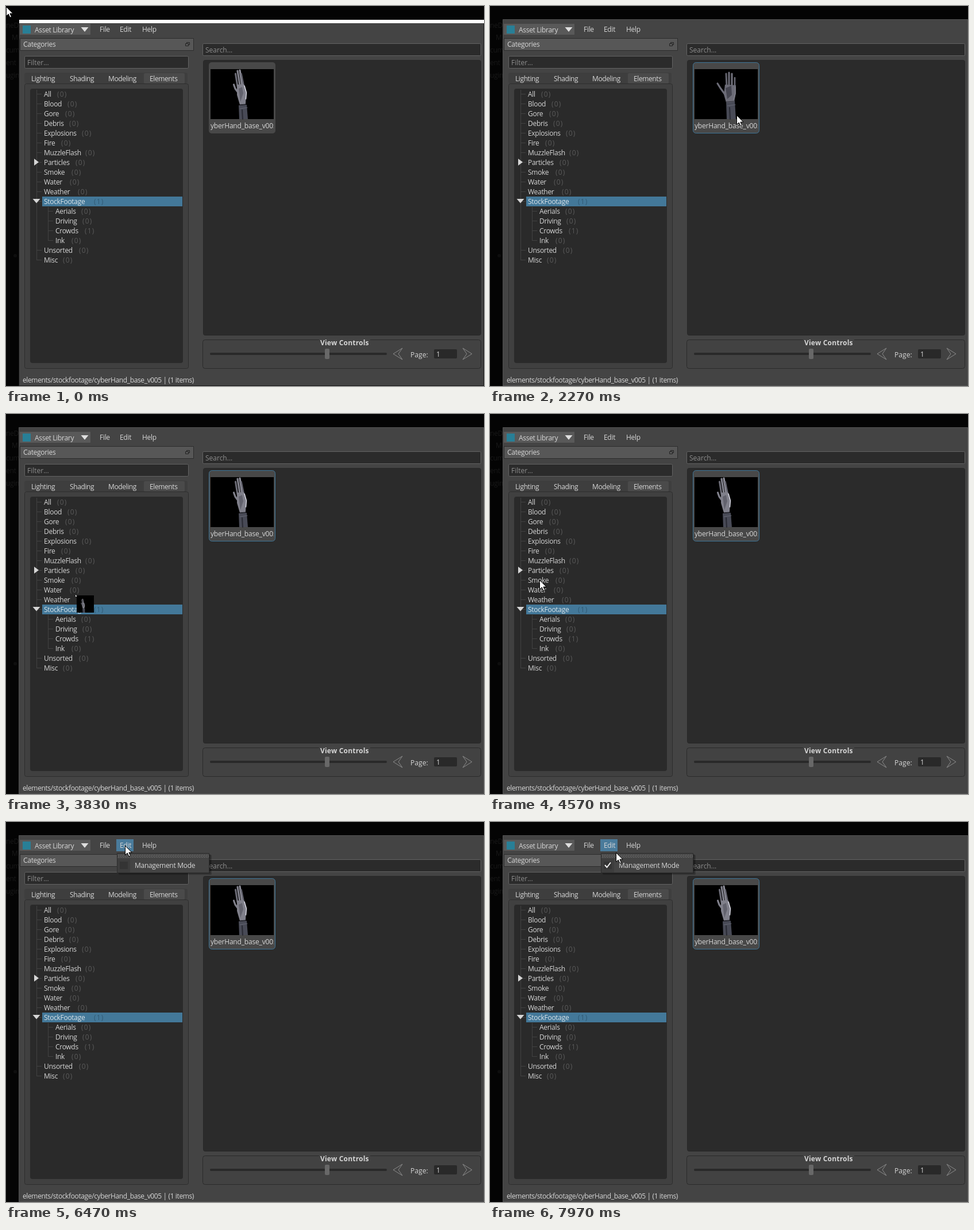
Animation, 832 px wide and 662 px high, one loop 8 s. Source, as an HTML page with a canvas:

```html
<!DOCTYPE html>
<html lang="en">
<head>
<meta charset="utf-8">
<title>Asset Library</title>
<style>
html, body { margin: 0; width: 100%; height: 100%; overflow: hidden; background: #000; }
canvas { display: block; }
</style>
</head>
<body>
<canvas id="stage" width="832" height="662"></canvas>
<script>
const ctx = document.getElementById('stage').getContext('2d');
const LOOP = 8000;
const ACTIVATE = 1770, SELECT = 1970, DRAG = 3130, DROP = 4570;
const OPEN = 6100, CHECK = 7270, REOPEN = 7800;
const BLUE = '#437899', DARK = '#2b2b2b', TEXT = '#d6d6d6', DIM = '#5a5a5a';

// Pointer path: time, x, y
const path = [
  [0, 0, 1], [370, 0, 1], [650, 150, 230], [840, 290, 317], [1030, 376, 190], [1170, 430, 166],
  [1230, 432, 168], [1330, 437, 178], [1970, 437, 178], [2100, 440, 212], [2270, 429, 190],
  [2470, 405, 166], [2700, 405, 166], [2870, 401, 176], [3130, 401, 176], [3430, 355, 247],
  [3700, 190, 339], [3930, 96, 295], [4000, 96, 295], [4170, 86, 289], [4900, 86, 289],
  [5130, 200, 345], [5430, 414, 220], [5700, 345, 117], [5730, 345, 117], [6120, 207, 41],
  [6470, 207, 41], [6700, 247, 69], [6870, 247, 69], [6930, 241, 68], [7570, 241, 68],
  [7780, 208, 41], [7970, 219, 53], [8000, 219, 53]
];

// Name, count, count position, indent
const tree = [
  ['All', 0, 89], ['Blood', 0, 107], ['Gore', 0, 103], ['Debris', 0, 110], ['Explosions', 0, 132],
  ['Fire', 0, 96], ['MuzzleFlash', 0, 138], ['Particles', 0, 121], ['Smoke', 0, 114],
  ['Water', 0, 111], ['Weather', 0, 125], ['StockFootage', 1, 153], ['Aerials', 0, 131, 20],
  ['Driving', 0, 133, 20], ['Crowds', 1, 137, 20], ['Ink', 0, 114, 20],
  ['Unsorted', 0, 127], ['Misc', 0, 99]
];

function pointerAt(t) {
  const i = Math.max(0, path.findIndex(p => p[0] > t) - 1);
  const a = path[i], b = path[i + 1], span = b[0] - a[0], u = (t - a[0]) / span;
  const still = (p, q) => !p || !q || (p[1] === q[1] && p[2] === q[2]);
  const slope = (k, axis) => {
    const p = path[k - 1], q = path[k + 1];
    return still(p, path[k]) || still(q, path[k]) ? 0 : (q[axis] - p[axis]) / (q[0] - p[0]) * span;
  };
  return [1, 2].map(axis =>
    (1 + 2 * u) * (1 - u) ** 2 * a[axis] + u * (1 - u) ** 2 * slope(i, axis) +
    u * u * (3 - 2 * u) * b[axis] - u * u * (1 - u) * slope(i + 1, axis));
}

function rect(x, y, w, h, fill, border, radius = 0) {
  ctx.beginPath();
  const o = border ? .5 : 0;
  ctx.roundRect(x + o, y + o, w - 2 * o, h - 2 * o, radius);
  if (fill) { ctx.fillStyle = fill; ctx.fill(); }
  if (border) { ctx.strokeStyle = border; ctx.lineWidth = 1; ctx.stroke(); }
}

function poly(points, fill, stroke, width = 1) {
  ctx.beginPath();
  points.forEach(p => ctx.lineTo(p[0], p[1]));
  if (fill) { ctx.closePath(); ctx.fillStyle = fill; ctx.fill(); }
  if (stroke) { ctx.strokeStyle = stroke; ctx.lineWidth = width; ctx.stroke(); }
}

function text(str, x, y, color = TEXT, spacing = -.3, weight = 400) {
  ctx.font = weight + ' 12px "Open Sans", "Noto Sans", sans-serif';
  ctx.letterSpacing = spacing + 'px';
  ctx.fillStyle = color;
  ctx.fillText(str, x, y);
}

// turn: 0 is the side pose, 1 the open palm
function drawHand(turn) {
  const mix = (x, y, X, Y) => [x + (X - x) * turn, y + (Y - y) * turn];
  const shade = (side, palm) => {
    const v = side + (palm - side) * turn;
    return `rgb(${v},${v},${v + 11})`;
  };
  const skin = shade(128, 108);
  ctx.lineCap = ctx.lineJoin = 'round';
  // forearm
  poly([mix(405, 173, 411, 166), mix(419, 172, 426, 165), mix(421, 197, 428, 197), mix(406, 197, 412, 197)], '#484a56');
  poly([mix(407, 179, 413, 174), mix(420, 177, 427, 172)], null, '#656773');
  poly([mix(411, 181, 417, 177), mix(412, 197, 418, 197)], null, '#2a2b34', 2);
  // thumb and fingers
  poly([mix(396.5, 137, 396, 135), mix(399, 144, 401, 143), mix(405, 152, 409, 154)], null, skin, 3.2);
  poly([mix(399.5, 118, 411, 118), mix(403, 140, 412, 140)], null, shade(108, 100), 3);
  poly([mix(403, 113, 416, 116), mix(407, 138, 416, 140)], null, skin, 3.2);
  poly([mix(407, 112, 421, 118), mix(411, 138, 421, 140)], null, shade(140, 112), 3.2);
  poly([mix(409.5, 118, 426, 125), mix(414, 140, 426, 142)], null, shade(100, 105), 2.6);
  // palm and lit edge
  poly([mix(402, 137, 409, 137), mix(414, 136, 428, 138), mix(418, 151, 428, 152), mix(417, 171, 425, 167),
    mix(407, 172, 411, 168), mix(402, 155, 407, 154)], skin);
  poly([mix(405, 144, 410, 143), mix(411, 141, 420, 139), mix(413, 152, 421, 155), mix(408, 167, 413, 162)], shade(98, 70));
  poly([mix(415, 139, 427, 141), mix(418.5, 151, 427, 152), mix(417.5, 162, 424, 163)], null, shade(225, 125), 1.5);
  poly([mix(407, 172, 411, 167), mix(417, 171, 425, 166)], null, '#30313a');
  ctx.lineCap = 'butt';
  ctx.lineJoin = 'miter';
}

function drawFrame(active) {
  rect(0, 0, 832, 662, '#040404');
  [['neD', 38], ['M', 59], ['cum', 81], ['ent', 103], ['ugin', 125]]
    .forEach(([s, y]) => text(s, s === 'M' ? 10 : 0, y, '#191919'));
  rect(13, 432, 6, 6, '#0e0e0e', null, 3);
  rect(22, 23, 810, 639, '#444', active ? '#4f4f4f' : '#171717');
  if (!active) {
    rect(22, 23, 810, 1, '#040404');
    rect(23, 24, 809, 6, '#fff');
  }
  rect(24, 31, 123, 19, '#595959');
  rect(29, 34, 14, 14, '#287f96');
  text('Asset Library', 50, 46);
  poly([[130.5, 37], [143.5, 37], [137, 45]], '#dedede');
  text('File', 163, 45);
  text('Help', 237, 45);
}

function drawCategories() {
  rect(24, 56, 303, 22, '#575757', '#2c2c2c');
  text('Categories', 30, 71);
  rect(314, 63, 6, 5, null, '#222');
  rect(312, 65, 6, 5, '#575757', '#222');
  rect(32, 87, 286, 22, DARK, '#626262', 2);
  text('Filter...', 37, 103, '#8d8d8d', 0);
  rect(32, 116, 284, 19, '#3e3e3e', null, 4);
  rect(240, 117, 71, 18, '#4a4a4a', null, 2);
  [['Lighting', 44], ['Shading', 111], ['Modeling', 178], ['Elements', 250]].forEach(([s, x]) => text(s, x, 131, TEXT, -.4));
  rect(32, 135, 286, 497, '#404040', '#2d2d2d', 3);
  rect(42, 144, 266, 478, '#2a2a2a', null, 4);
  rect(53, 146, 1, 297, '#424242');
  rect(73, 350, 1, 59, '#424242');
  rect(63, 332, 244, 17, BLUE);
  tree.forEach(([name, count, countX, indent = 0], i) => {
    const y = 158 + 17 * i, selected = name === 'StockFootage';
    rect(53 + indent, y - 5, 9, 1, '#424242');
    text(name, 66 + indent, y, selected ? '#d8e2e8' : TEXT);
    text(`(${count})`, countX, y, selected ? '#315a74' : DIM, 1.2);
  });
  poly([[49, 266], [57, 272], [49, 278]], '#d5d5d5');
  poly([[46.5, 336], [59.5, 336], [53, 343.5]], '#d5d5d5');
}

function drawAssets(turn, selected) {
  rect(342, 65, 485, 22, DARK, '#626262', 2);
  text('Search...', 347, 81, '#8d8d8d', 0);
  rect(343, 94, 484, 480, '#2b2b2b', '#272727', 3);
  rect(353, 98, 116, 124, '#484848', selected ? '#3f7698' : null, 5);
  rect(356, 110, 110, 87, '#000');
  ctx.save();
  ctx.beginPath();
  ctx.rect(356, 110, 110, 110);
  ctx.clip();
  drawHand(turn);
  ctx.textAlign = 'center';
  text('cyberHand_base_v005', 411, 213, TEXT, -.2);
  ctx.restore();
}

function drawControls() {
  rect(342, 581, 485, 51, '#424242', '#2a2a2a', 4);
  rect(545, 580, 89, 3, '#444');
  text('View Controls', 547, 591, TEXT, .2, 700);
  rect(355, 604, 308, 4, '#292929', null, 2);
  rect(555, 597, 8, 18, '#686868', null, 2);
  for (const [x, dir] of [[690, -1], [795, 1]]) {
    const chevron = tip => [[x, 596], [x + dir * tip, 606], [x, 616]];
    poly([...chevron(16), [x + dir * 7, 606], [x, 596]], null, '#8c8c8c');
  }
  text('Page:', 704, 612, TEXT, .1);
  rect(745, 598, 40, 16, '#292929', null, 2);
  text('1', 749, 611);
  text('elements/stockfootage/cyberHand_base_v005 | (1 items)', 29, 656, TEXT, -.38);
}

function drawMenu(open, overEdit, overItem, checked) {
  if (open || overEdit) rect(192, 30, 30, 21, '#4a7b9b');
  text('Edit', 198, 45);
  if (!open) return;
  rect(196, 57, 162, 35, 'rgba(0,0,0,.22)', null, 2);
  rect(195, 56, 161, 34, 'rgba(0,0,0,.25)', null, 2);
  rect(193, 54, 161, 35, '#444', '#2d2d2d');
  for (let x = 195; x < 352; x += 3) {
    for (let row = 0; row < 3; row++) rect(x + row % 2, 57 + 2 * row, 1, 1, '#959595');
  }
  rect(194, 64, 22, 24, '#3d3d3d');
  if (overItem) rect(197, 64, 156, 24, BLUE);
  rect(198, 69, 14, 13, '#343434');
  if (checked) poly([[200, 75], [203.5, 79], [210, 70.5]], null, '#f2f2f2', 2);
  text('Management Mode', 224, 80);
}

function drawPointer(x, y) {
  ctx.save();
  ctx.translate(Math.round(x) + .5, Math.round(y) + .5);
  poly([[0, 0], [0, 16], [3.8, 12.5], [6.5, 18.5], [9, 17.4], [6.4, 11.6], [11.5, 11.6], [0, 0]], '#fff', '#000');
  ctx.restore();
}

function drawDrag(x, y) {
  ctx.save();
  ctx.translate(Math.round(x), Math.round(y));
  poly([[0, 0], [3, 3], [0, 3]], '#fff');
  ctx.translate(2, 1);
  rect(0, 0, 30, 30, '#000');
  ctx.beginPath();
  ctx.rect(0, 0, 30, 30);
  ctx.clip();
  ctx.translate(11, 30);
  ctx.scale(.28, .28);
  ctx.translate(-408, -197);
  drawHand(0);
  ctx.restore();
}

function draw(t) {
  const [x, y] = pointerAt(t);
  const inside = (l, top, r, b) => x >= l && x < r && y >= top && y < b;
  const dragging = t >= DRAG && t < DROP;
  const open = (t >= OPEN && t < CHECK) || t >= REOPEN;
  const hover = !dragging && inside(353, 98, 469, 222);
  const turn = hover ? Math.min(1, Math.max(0, (x - 377) / 45)) : 0;
  drawFrame(t >= ACTIVATE);
  drawCategories();
  drawAssets(turn, t >= SELECT);
  drawControls();
  drawMenu(open, inside(192, 30, 222, 51), open && inside(194, 64, 353, 88), t >= CHECK);
  (dragging ? drawDrag : drawPointer)(x, y);
}

const start = performance.now();
function tick() {
  draw((performance.now() - start) % LOOP);
  requestAnimationFrame(tick);
}
tick();
</script>
</body>
</html>
```
